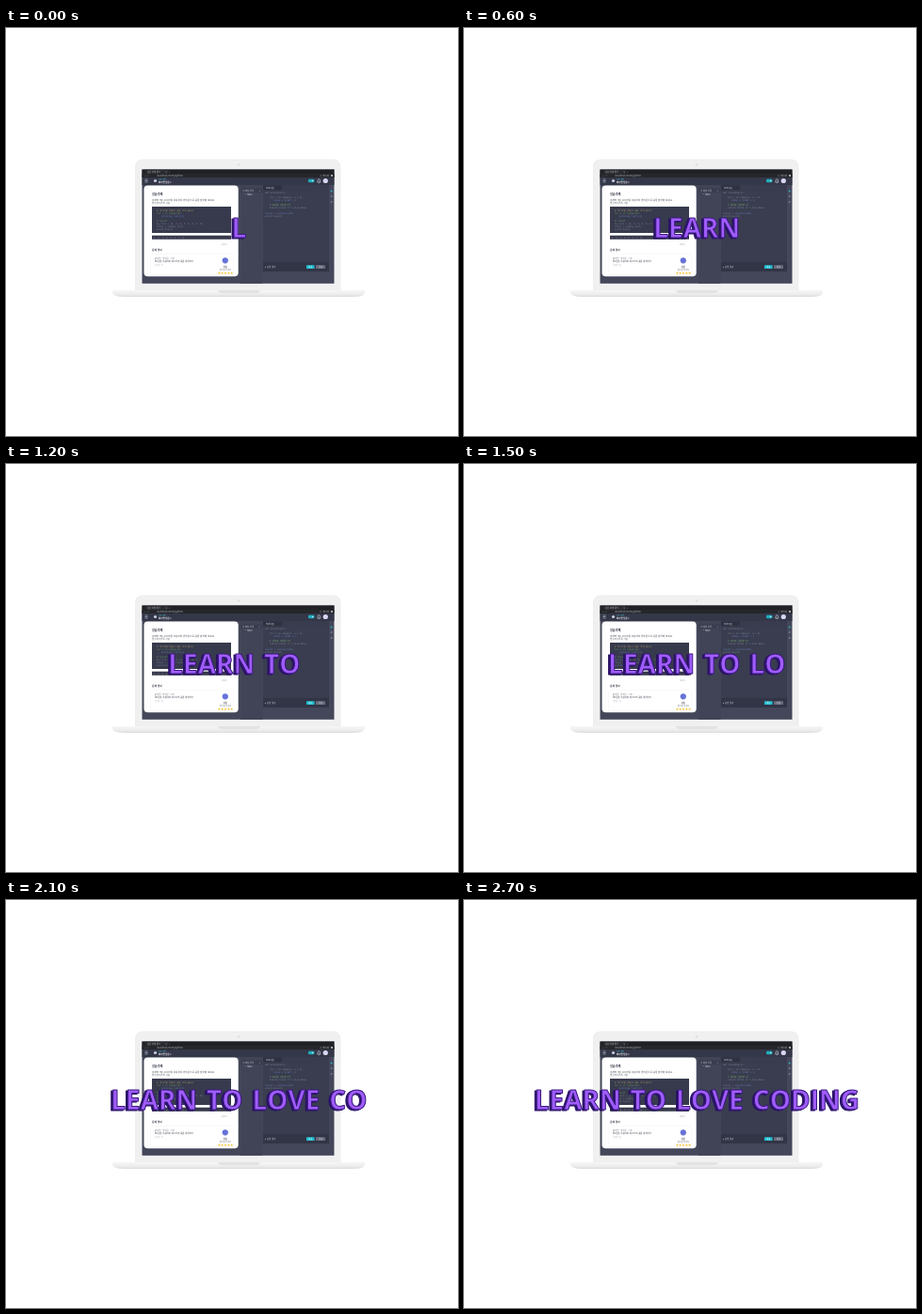
Write an HTML page that moves like this. It is 480 by 434 pixels and loops after 2850 ms.

```html
<!DOCTYPE html>
<html lang="ko">
<head>
<meta charset="utf-8">
<title>Learn to love coding</title>
<style>
  html, body { margin: 0; width: 100%; height: 100%; overflow: hidden; background: #fff; }
  svg { display: block; width: 480px; height: 434px; font-size: 2.6px; }
  text { font-family: "Noto Sans CJK KR", "Noto Sans CJK", "Noto Sans", sans-serif; white-space: pre; }
  .code text { font-family: "DejaVu Sans Mono", monospace; font-size: 2.4px; fill: #858aa0; }
  .code .green { fill: #6fa06a; }
  .code .gold { fill: #a49a62; }
  .code .blue { fill: #6b86c4; }
  .bold { font-weight: 700; }
  #slogan {
    font: 700 28px "Open Sans", "Noto Sans", sans-serif;
    font-kerning: none; word-spacing: 2.6px; text-anchor: middle;
    fill: #a05cfc; stroke: #3a1a80; stroke-width: 1px; stroke-linejoin: round;
    filter: drop-shadow(-1.2px 1px 0 #2a1266);
  }
</style>
</head>
<body>
<svg viewBox="0 0 480 434">
  <defs>
    <linearGradient id="base" x1="0" y1="0" x2="0" y2="1">
      <stop offset="0" stop-color="#f7f6f7"/>
      <stop offset=".6" stop-color="#eeedee"/>
      <stop offset="1" stop-color="#dddcdd"/>
    </linearGradient>
  </defs>

  <!-- laptop -->
  <path d="M137.5 280V148q0-8 8-8H347q8 0 8 8V280Z" fill="#f1f0f1" stroke="#e8e7e8" stroke-width=".6"/>
  <circle cx="247" cy="145.5" r="1.3" fill="#dedede"/>
  <path d="M113 279H381V281.5Q380 286 368 286H126Q114 286 113 281.5Z" fill="url(#base)"/>
  <path d="M225 279H270Q269 282.3 265 282.3H230Q226 282.3 225 279Z" fill="#e4e3e4"/>

  <!-- browser -->
  <rect x="144.5" y="150.5" width="204" height="121.3" fill="#44475a"/>
  <rect x="144.5" y="150.5" width="204" height="8.5" fill="#202124"/>
  <path d="M148 155v-3q0-1 1-1h22q1 0 1 1v3Z" fill="#2a2b30"/>
  <text x="150" y="154.1" font-size="2.3" fill="#b9bbc2">실습 과제 풀기</text>
  <text x="169" y="154.1" fill="#b9bbc2">×  +</text>
  <rect x="144.5" y="155" width="204" height="4" fill="#26272b"/>
  <text x="147" y="158.1" fill="#9ea1aa">‹ › ○</text>
  <text x="160" y="158.1" fill="#a5a8b0">localhost/learn/python</text>
  <text x="333" y="158.1" fill="#c5c7cc">☆ 게스트</text>
  <circle cx="346" cy="157" r="1.1" fill="#c5c7cc"/>

  <!-- app header -->
  <rect x="144.5" y="159" width="204" height="8" fill="#343748"/>
  <path d="M147.5 161h3m-3 1.5h3m-3 1.5h3" stroke="#bfc3d2" stroke-width=".6"/>
  <circle cx="158.5" cy="162.5" r="1.6" fill="#c9cde0"/>
  <text x="162" y="161.7" font-size="2" fill="#43b5c0">기초 과정</text>
  <text class="bold" x="162" y="164.8" font-size="2.4" fill="#f2f3f7">파이썬 입문 ▾</text>
  <rect x="321" y="160.7" width="6.4" height="3.5" rx="1" fill="#20aebf"/>
  <circle cx="325.7" cy="162.5" r=".8" fill="#c0e9ee"/>
  <path d="M330.5 164q.7-.6.7-2 0-1.4 1.1-1.4t1.1 1.4q0 1.4.7 2Zm1.3.7h1" fill="none" stroke="#d0d3df" stroke-width=".6"/>
  <circle cx="339.3" cy="162.5" r="2.6" fill="#d9d5f3"/>

  <!-- lesson card -->
  <rect x="146.5" y="167.5" width="100.2" height="96.7" rx="4" fill="#fff"/>
  <text x="149" y="171" font-size="2.4" fill="#a5a8b4">‹</text>
  <text class="bold" x="155" y="178" font-size="3.1" fill="#303342">실습과제</text>
  <text x="155" y="184.2" fill="#4c4f5c">아래의 my_score를 이용하여 반복문으로 값을 출력해 보세요.</text>
  <text x="155" y="187" font-size="2.4" fill="#4c4f5c">변수와 리스트 사용</text>
  <rect x="155" y="190" width="84" height="28" fill="#373a4c"/>
  <g class="code">
    <text class="gold" x="160" y="194.5"># 리스트를 만들고 값을 더해 봅니다</text>
    <text class="green" x="160" y="197.8">for i in range(10):</text>
    <text class="blue" x="165" y="201">print(my_list[i])</text>
    <text class="green" x="160" y="206.4"># result</text>
    <text x="160" y="209.4">my_list = [1, 2, 3, 4, 5, 6, 7, 8]</text>
    <text x="160" y="212.4">total = sum(my_list)</text>
    <text x="160" y="215.4">print(total)</text>
  </g>
  <rect x="155" y="220.7" width="84" height="4.1" fill="#373a4c"/>
  <g class="code"><text x="157" y="223.6">1  2  3  4  5  6  7  8</text></g>
  <text x="229" y="231" font-size="2.2" fill="#9b9eac">더보기</text>
  <text class="bold" x="155" y="237" font-size="2.7" fill="#3c3f4d">문제 정보</text>
  <rect x="153.5" y="240.5" width="88" height="22" rx="1.5" fill="#fff" stroke="#f5f5f7" stroke-width=".6"/>
  <text x="158" y="246" font-size="2.3" fill="#777a87">파이썬 · 반복문 · 기초</text>
  <text x="158" y="249.3" font-size="2.4" fill="#363946">for문을 사용하여 리스트의 값을 출력하기</text>
  <text x="158" y="253" font-size="2.2" fill="#b1b3bd">난이도 하</text>
  <circle cx="232.8" cy="247.3" r="3.1" fill="#6672d8"/>
  <g text-anchor="middle">
    <text class="bold" x="232.8" y="254.6" font-size="2.2" fill="#555866">쉬움</text>
    <text x="233" y="258.4" font-size="2.2" fill="#777a87">평가를 남겨요</text>
    <text x="233" y="261.5" font-size="3.3" fill="#f6bf2b">★★★★★</text>
  </g>

  <!-- file list -->
  <rect x="249" y="167" width="23.5" height="104.8" fill="#414456"/>
  <rect x="249" y="170.5" width="23.5" height="4.5" fill="#3a3d4e"/>
  <text x="251" y="173.9" font-size="2.3" fill="#c9ccd8">▣ 파일 목록</text>
  <text x="268.5" y="173.9" fill="#c9ccd8">+</text>
  <text x="253" y="177.9" font-size="2.3" fill="#d7d9e3">▪ main</text>

  <!-- editor -->
  <rect x="273" y="167" width="70" height="91" fill="#393c4e"/>
  <rect x="273" y="167.5" width="20" height="5" fill="#2e3140"/>
  <text x="276" y="171" font-size="2.3" fill="#c9ccd8">main.py</text>
  <rect x="273" y="172.5" width="69" height="76" fill="#3a3d4f"/>
  <g class="code">
    <text x="275" y="176">def solution(n):</text>
    <text x="280" y="181">for i in range(1, n + 1):</text>
    <text class="blue" x="284" y="184">total = total + i</text>
    <text class="green" x="280" y="189"># 합계를 반환합니다</text>
    <text x="280" y="192">return total if n else None</text>
    <text class="blue" x="275" y="198">result = solution(10)</text>
    <text x="275" y="201.3">print(result)</text>
  </g>
  <rect x="273" y="249" width="70" height="10" fill="#323546"/>
  <text x="275" y="255" font-size="2.4" fill="#c9ccd8">▸ 실행 결과</text>
  <rect x="319" y="252.3" width="8.6" height="3.6" rx=".5" fill="#22bfd0"/>
  <text x="321.3" y="255" font-size="2.1" fill="#fff">제출</text>
  <rect x="329" y="252.3" width="10" height="3.6" rx=".5" fill="#686c7e"/>
  <text x="332" y="255" font-size="2.1" fill="#e4e6ed">실행</text>
  <circle cx="345.6" cy="173.5" r=".9" fill="#2cb8c7"/>
  <path d="M344.8 179h1.7m-1.7 6h1.7" stroke="#a0a4b6" stroke-width="1.1"/>

  <text id="slogan" x="247.3" y="223" xml:space="preserve">L</text>
</svg>
<script>
  const phrase = "LEARN TO LOVE CODING";
  const slogan = document.getElementById("slogan");
  const STEP = 150, STEPS = 19;
  let shown = -1;

  function draw() {
    const step = Math.floor(performance.now() / STEP) % STEPS;
    if (step !== shown) {
      shown = step;
      // the last space arrives together with its next letter
      slogan.textContent = phrase.slice(0, step < 13 ? step + 1 : step + 2);
    }
    requestAnimationFrame(draw);
  }
  draw();
</script>
</body>
</html>
```
